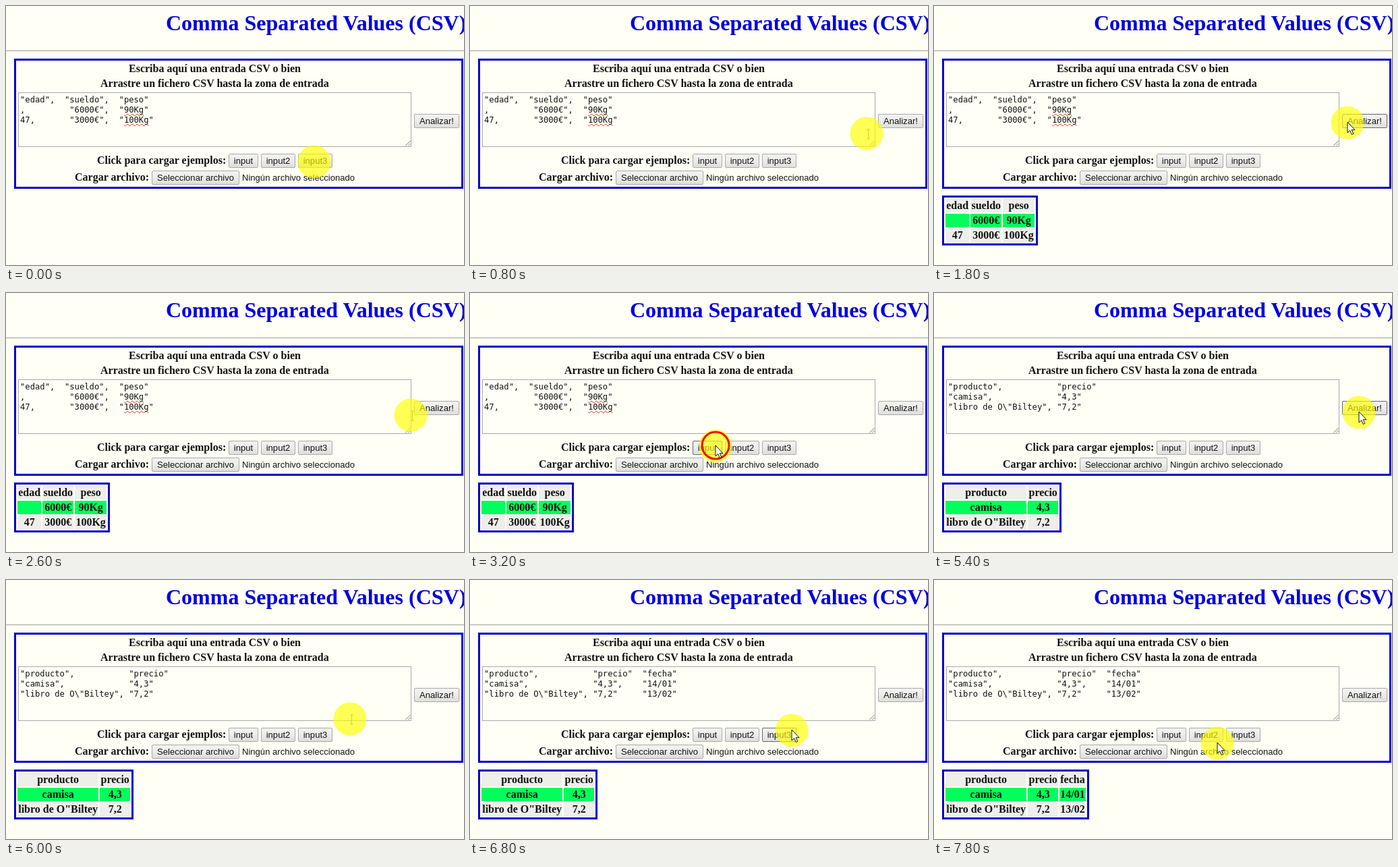
Animation of 679 by 384 pixels, one loop 8000 ms. Source, as an HTML page:

```html
<!DOCTYPE html>
<html lang="es">
<head>
<meta charset="utf-8">
<title>Comma Separated Values (CSV)</title>
<style>
html, body { margin: 0; width: 100%; height: 100%; overflow: hidden; background: #fffff6; }
#stage { position: relative; width: 679px; height: 384px; overflow: hidden; color: #111;
  font: bold 16px/18px "Liberation Serif", "Times New Roman", serif; }
#stage > * { position: absolute; box-sizing: border-box; margin: 0; white-space: pre; }
h1 { left: 237px; top: 7px; font-size: 32px; line-height: 36px; color: #0000e0; }
#rule { left: 0; top: 66px; width: 679px; height: 1px; background: #a0a098; }
#panel { left: 12px; top: 78px; width: 666px; height: 193px; border: 3px solid #0000cc; }
#input { left: 18px; top: 128px; width: 583px; height: 81px; padding: 3px 2px 2px;
  border: 1px solid #a9a9a9; font: 12.18px/15px "DejaVu Sans Mono", monospace; }
#input u { text-decoration: underline wavy #e0301c 1px; text-underline-offset: 1px; text-decoration-skip-ink: none; }
#grip { left: 591px; top: 199px; }
.button, .plain { font: 13.07px/19px "Liberation Sans", Arial, sans-serif; }
.button { height: 21px; border: 1px solid #a9a9a9; border-radius: 2px; text-align: center;
  background: linear-gradient(#f2f2f0, #eeeeec 40%, #dededc); }
.button.over { border-color: #666; }
#result { left: 12px; top: 281px; border: 3px solid #0000c4; border-spacing: 2px; }
#result td { padding: 1px 1.2px; height: 18px; text-align: center; background: #eeeeea; }
#result tr:nth-child(2) td { background: #00ff5c; }
#pointer { left: 0; top: 0; overflow: visible; }
</style>
</head>
<body>
<div id="stage">
  <h1>Comma Separated Values (CSV)</h1>
  <div id="rule"></div>
  <div id="panel"></div>
  <span style="left:182px;top:84px">Escriba aquí una entrada CSV o bien</span>
  <span style="left:140px;top:106px">Arrastre un fichero CSV hasta la zona de entrada</span>
  <div id="input"></div>
  <svg id="grip" width="9" height="9"><path d="M1 8.500L8.500 1M5 8.500L8.500 5" stroke="#777"/></svg>
  <span class="button" style="left:605px;top:160px;width:67px">Analizar!</span>
  <span style="left:135px;top:220px">Click para cargar ejemplos:</span>
  <span class="button" style="left:330px;top:219px;width:44px">input</span>
  <span class="button" style="left:378px;top:219px;width:51px">input2</span>
  <span class="button" style="left:433px;top:219px;width:51px">input3</span>
  <span style="left:102px;top:245px">Cargar archivo:</span>
  <span class="button" style="left:216px;top:244px;width:130px">Seleccionar archivo</span>
  <span class="plain" style="left:350px;top:245px">Ningún archivo seleccionado</span>
  <table id="result"></table>
  <svg id="pointer" width="1" height="1">
    <circle cy="1" r="24.500" fill="#ffff00" fill-opacity=".66"/>
    <circle id="ring" r="20" fill="none" stroke="#e81408" stroke-width="3"/>
    <path id="arrow" d="M0 0V16L3.700 12.600 6.300 18.500 8.800 17.400 6.200 11.700H11Z" fill="#fff" stroke="#111"/>
    <path id="beam" d="M0 -5H5M2.500 -5V9M0 9H5" fill="none" stroke="#d8d020"/>
  </svg>
</div>
<script>
const STEP = 200, LOOP = 8000;
const $ = id => document.getElementById(id);

// [step, x, y]: straight moves, sampled once per step
const path = [
  [0, 457, 230], [2, 500, 216], [5, 632, 174], [7, 634, 173], [9, 613, 172],
  [12, 622, 174], [13, 600, 180], [14, 520, 200], [15, 420, 220], [16, 364, 226],
  [19, 366, 226], [20, 385, 224], [21, 385, 224], [22, 550, 191], [24, 625, 176],
  [27, 630, 176], [29, 600, 182], [31, 420, 228], [33, 404, 230], [34, 477, 222],
  [35, 570, 192], [36, 632, 174], [37, 632, 174], [38, 540, 205], [39, 420, 241]
];
const clicks = [7, 16, 25, 32, 36];

const inputs = [
  [0, `"edad",  "sueldo",  "peso"
,         "6000€",  "<u>90Kg</u>"
47,       "3000€",  "<u>100Kg</u>"`],
  [17, `"producto",           "precio"
"camisa",             "4,3"
"libro de O\\"Biltey", "7,2"`],
  [33, `"producto",           "precio"  "fecha"
"camisa",             "4,3",    "14/01"
"libro de O\\"Biltey", "7,2"     "13/02"`]
];
const results = [
  [0, ""],
  [8, "edad|sueldo|peso\n|6000€|90Kg\n47|3000€|100Kg"],
  [26, 'producto|precio\ncamisa|4,3\nlibro de O"Biltey|7,2'],
  [37, 'producto|precio|fecha\ncamisa|4,3|14/01\nlibro de O"Biltey|7,2|13/02']
];

const current = (states, step) => states.filter(s => s[0] <= step).pop()[1];
const toRows = text => text.split("\n").map(row =>
  "<tr>" + row.split("|").map(cell => `<td>${cell}</td>`).join("") + "</tr>").join("");
const show = (el, on) => el.style.visibility = on ? "visible" : "hidden";

function locate(step) {
  const i = Math.max(1, path.findIndex(p => p[0] >= step));
  const [a, x0, y0] = path[i - 1], [b, x1, y1] = path[i];
  const f = (step - a) / (b - a);
  return [x0 + (x1 - x0) * f, y0 + (y1 - y0) * f];
}

const within = (el, x, y) =>
  x >= el.offsetLeft && x < el.offsetLeft + el.offsetWidth &&
  y >= el.offsetTop && y < el.offsetTop + el.offsetHeight;

function draw(step) {
  const [x, y] = locate(step);
  const typing = within($("input"), x, y);
  const table = current(results, step);
  $("input").innerHTML = current(inputs, step);
  $("result").innerHTML = toRows(table);
  show($("result"), table);
  $("pointer").style.transform = `translate(${Math.round(x)}px, ${Math.round(y)}px)`;
  show($("ring"), clicks.includes(step));
  show($("beam"), typing);
  show($("arrow"), !typing && step > 0);
  for (const b of document.querySelectorAll(".button"))
    b.classList.toggle("over", step > 0 && within(b, x, y));
}

let last = -1;
const start = performance.now();
function tick(now) {
  const step = Math.floor(Math.max(0, now - start) % LOOP / STEP);
  if (step !== last) draw(last = step);
  requestAnimationFrame(tick);
}
tick(start);
</script>
</body>
</html>
```
